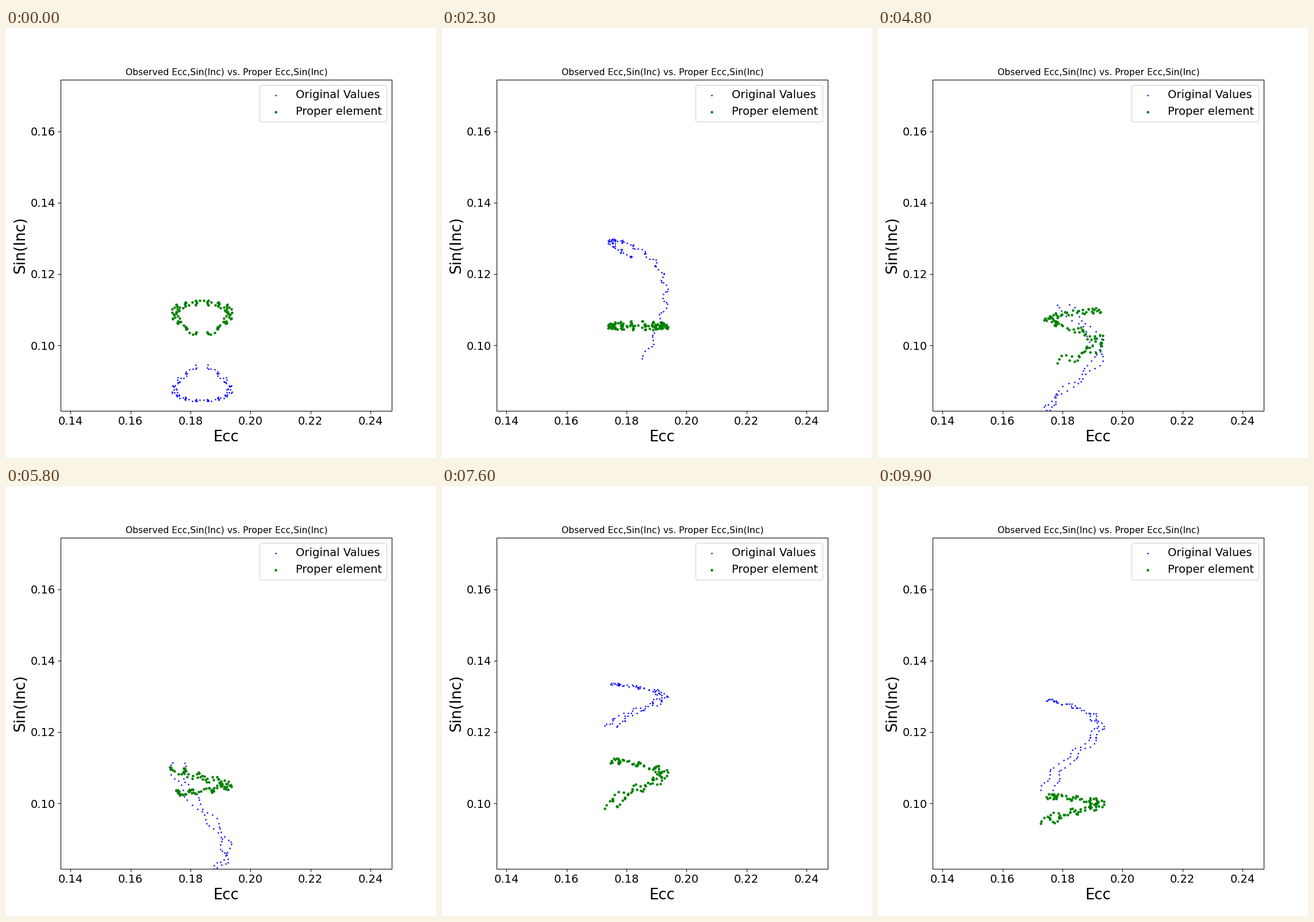
A matplotlib script for the animation above (10000 ms loop, 748 by 748 pixels).

```python
import numpy as np
import matplotlib.pyplot as plt
from matplotlib.animation import FuncAnimation

FRAMES, INTERVAL = 100, 100
TAU = 2 * np.pi
MID_ECC, MID_SIN = 0.1838, 0.108
ECC_SWING, SIN_SWING = 0.0082, 0.019

t = np.linspace(-1, 1, 100)      # position of each sample along the curve
arch = np.cos(t * np.pi / 2)     # 0 at both ends, 1 in the middle

# Key shapes: end and tip of each arch in Sin(Inc), turns and phase in Ecc.
key_frames = [0, 13, 32, 48, 58, 76, 99]
observed_end = [0.0942, 0.0961, 0.1116, 0.1116, 0.1116, 0.1216, 0.1040]
observed_tip = [0.0845, 0.0833, 0.0766, 0.0766, 0.0766, 0.1335, 0.1290]
proper_end = [0.1028, 0.1040, 0.1082, 0.0955, 0.1100, 0.0993, 0.0950]
proper_tip = [0.1120, 0.1110, 0.0997, 0.1098, 0.1030, 0.1120, 0.1020]
ecc_turns = [0.5, 0.5, 0.5, 1.33, 1, 1, 1]
ecc_phase = [0, 0, 0, 0.25, 0.75, 0.75, 0.75]
cycles = [round(f / 4) for f in key_frames]


def clouds(frame):
    """Observed and proper points at one moment."""
    def at(values):
        return np.interp(frame, key_frames, values)

    ripple = TAU * (7 * t + 0.3 * frame)
    ecc = (MID_ECC + 0.002 * t + 0.0009 * np.sin(ripple)
           + ECC_SWING * np.sin(TAU * (at(ecc_turns) * t + at(ecc_phase))))

    # The observed arch rides on the forced oscillation of the inclination.
    bend = (at(observed_end) - MID_SIN
            + (at(observed_tip) - at(observed_end)) * arch)
    angle = TAU * at(cycles)
    observed = (MID_SIN + bend * np.cos(angle) + SIN_SWING * t * np.sin(angle)
                + 0.0003 * np.cos(1.7 * ripple))

    proper = (at(proper_end) + (at(proper_tip) - at(proper_end)) * arch
              + 0.0007 * np.cos(1.3 * ripple))
    return np.column_stack([ecc, observed]), np.column_stack([ecc, proper])


fig, ax = plt.subplots(figsize=(8, 8), dpi=93.5)
ax.set_box_aspect(1)
blue_pts, green_pts = clouds(0)
blue = ax.scatter(*blue_pts.T, s=1, color="blue", label="Original Values")
green = ax.scatter(*green_pts.T, s=6, color="green", label="Proper element")
ax.set_xlim(0.13678, 0.24715)
ax.set_ylim(0.08166, 0.17455)
ax.set_xticks(np.arange(0.14, 0.25, 0.02))
ax.set_yticks(np.arange(0.10, 0.17, 0.02))
ax.tick_params(labelsize=15)
ax.set_xlabel("Ecc", fontsize=20)
ax.set_ylabel("Sin(Inc)", fontsize=20)
ax.set_title("Observed Ecc,Sin(Inc) vs. Proper Ecc,Sin(Inc)", fontsize=12)
ax.legend(loc="upper right", fontsize=15)


def update(frame):
    observed, proper = clouds(frame)
    blue.set_offsets(observed)
    green.set_offsets(proper)
    return blue, green


anim = FuncAnimation(fig, update, frames=FRAMES, interval=INTERVAL,
                     repeat=True, repeat_delay=0)
plt.show()
```
